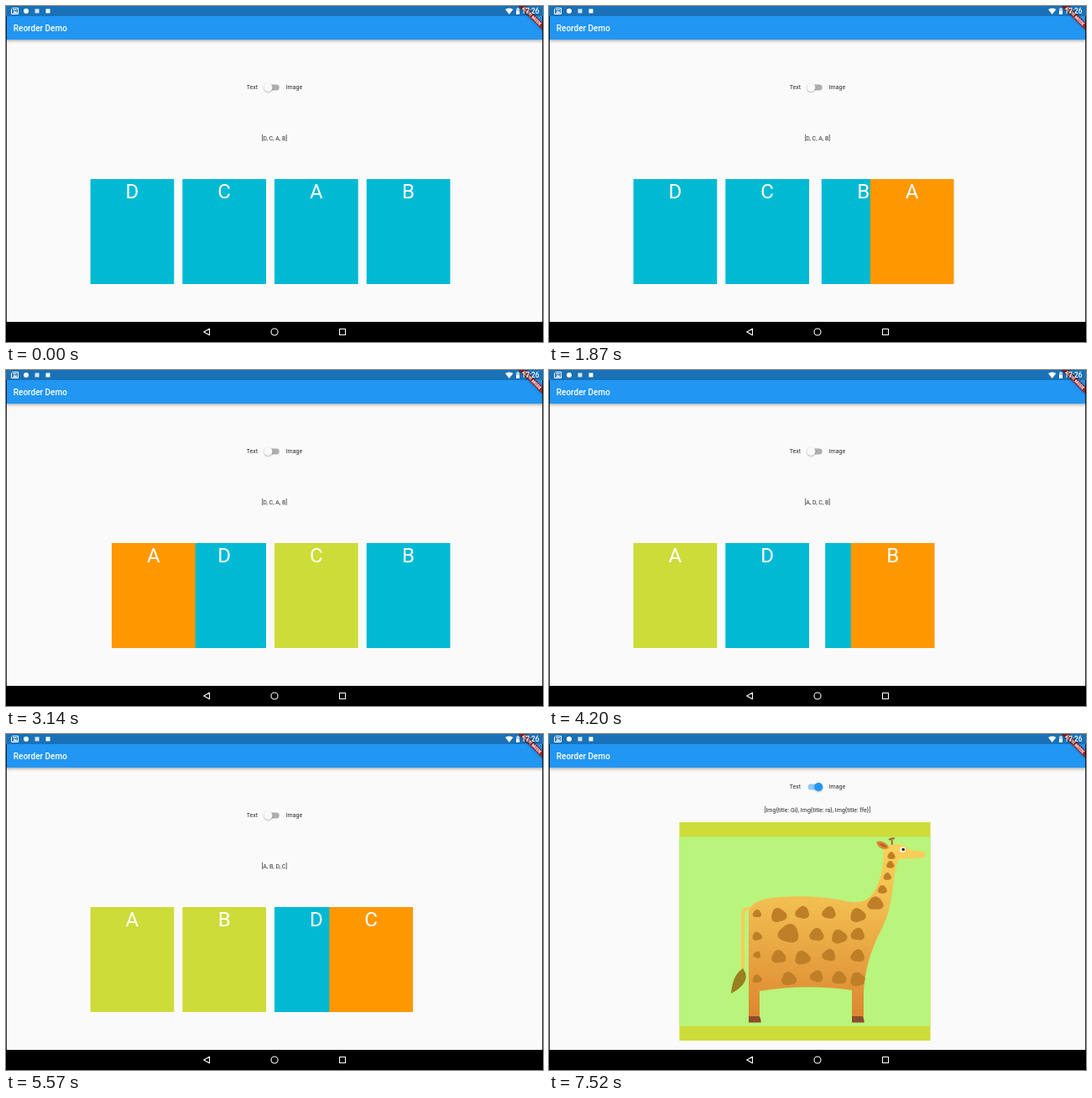
Recreate the animation shown at these times as an HTML page with a canvas. Size 640 by 400 pixels, loop 8000 ms.

```html
<!DOCTYPE html>
<html lang="en">
<head>
<meta charset="utf-8">
<title>Reorder Demo</title>
<style>
html, body { margin: 0; width: 100%; height: 100%; overflow: hidden; background: #fafafa; }
canvas { display: block; width: 640px; height: 400px; }
</style>
</head>
<body>
<canvas id="stage" width="640" height="400"></canvas>
<script>
const ctx = document.getElementById('stage').getContext('2d');
const LOOP = 8000, SLIDE = 250, SNAP = 50, TOGGLE = 7210;
const CYAN = '#00bad4', LIME = '#cddc39', ORANGE = '#ff9800', BLUE = '#2196f3';
const INK = '#2b2b2b';
const LEFT = 100.6, PITCH = 109.7, WIDTH = 99.7;

// grab: where the finger holds the tile; path: [time, x] key points.
const DRAGS = [
  { id: 'A', from: 500, to: 3350, grab: 34, path: [[1195, 320], [1640, 412], [1740, 412],
    [2350, 276], [2780, 160], [3140, 126], [3350, 114]] },
  { id: 'B', from: 3770, to: 5110, grab: 56, path: [[3820, 429.7], [4940, 224.3], [5110, 210]] },
  { id: 'C', from: 5250, to: 6100, grab: 50, path: [[5400, 429.7], [5950, 287]] }
];

const clamp = v => Math.max(0, Math.min(1, v));
const lerp = (a, b, p) => a + (b - a) * p;
const ease = p => p * p * (3 - 2 * p);
const slotX = i => LEFT + PITCH * i;

function along(path, t) {
  if (t <= path[0][0]) return path[0][1];
  for (let i = 1; i < path.length; i++) {
    const [t0, x0] = path[i - 1], [t1, x1] = path[i];
    if (t < t1) return lerp(x0, x1, (t - t0) / (t1 - t0));
  }
  return path[path.length - 1][1];
}

// The held tile takes a slot as soon as the finger enters it.
function planOrders(first) {
  const plan = [{ at: 0, order: first }];
  for (const { id, from, to, grab, path } of DRAGS) {
    for (let t = from; t < to; t += 10) {
      const { order } = plan[plan.length - 1];
      const offset = along(path, t) + grab - LEFT;
      const i = Math.floor(offset / PITCH);
      if (offset - i * PITCH > WIDTH || order[i] === id) continue;
      const rest = order.replace(id, '');
      plan.push({ at: t, order: rest.slice(0, i) + id + rest.slice(i) });
    }
  }
  return plan;
}

const PLAN = planOrders('DCAB');
const stepAt = t => PLAN.filter(s => s.at <= t).length - 1;

function box(x, y, w, h, color) {
  ctx.fillStyle = color;
  ctx.fillRect(x, y, w, h);
}

function disc(x, y, r, color) {
  ctx.fillStyle = color;
  ctx.beginPath();
  ctx.arc(x, y, r, 0, 2 * Math.PI);
  ctx.fill();
}

function shape(d, color) {
  ctx.fillStyle = color;
  ctx.fill(new Path2D(d));
}

function stroke(d, color, width) {
  ctx.strokeStyle = color;
  ctx.lineWidth = width;
  ctx.stroke(new Path2D(d));
}

function label(str, x, y, size, color, align = 'left', weight = 400) {
  ctx.font = `${weight} ${size}px Roboto, "Open Sans", sans-serif`;
  ctx.textAlign = align;
  ctx.fillStyle = color;
  ctx.fillText(str, x, y);
}

function withShadow(blur, dy, alpha, draw) {
  ctx.save();
  ctx.shadowColor = `rgba(0,0,0,${alpha})`;
  ctx.shadowBlur = blur;
  ctx.shadowOffsetY = dy;
  draw();
  ctx.restore();
}

function banner() {
  ctx.save();
  ctx.translate(639, 0);
  ctx.rotate(Math.PI / 4);
  withShadow(3, 0, 0.5, () => box(-20, 14, 40, 6, 'rgba(183,28,28,.85)'));
  label('SLOW MODE', 0, 18.8, 5.1, '#fff', 'center', 900);
  ctx.restore();
}

function statusBar() {
  box(0, 0, 640, 12, 'rgba(0,0,0,.25)');
  stroke('M7.5 2.5H14.5V9.5H6.5V3.5', '#fff', 1);
  shape('M8 8.5L10 5.5L11.3 7L12.3 6L13.8 8.5Z', '#fff');
  box(8, 4, 5, 1, '#fff');
  disc(24, 6, 3, '#fff');
  box(34.5, 3.5, 5, 5, '#d5e5f3');
  box(47.5, 3.5, 5, 5, '#fff');
  shape('M595 4Q599.7 .8 604.4 4L599.7 10Z', '#fff');
  box(608, 3, 4, 7, '#b7d0e6');
  box(609, 2, 2, 1, '#b7d0e6');
  box(608, 6, 4, 4, '#fff');
  label('17:26', 635.5, 9.3, 8.3, '#fff', 'right', 500);
}

function navBar() {
  box(0, 376, 640, 24, '#000');
  ctx.lineJoin = 'round';
  stroke('M242.5 384.2V391.8L235.7 388Z', '#fff', 1.1);
  stroke('M324 388A4 4 0 1 1 316 388A4 4 0 1 1 324 388Z', '#fff', 1.1);
  stroke('M397.5 384.5H404.5V391.5H397.5Z', '#fff', 1.1);
}

function frame() {
  box(0, 0, 640, 400, '#fafafa');
  withShadow(4, 1, 0.4, () => box(0, 0, 640, 40, BLUE));
  label('Reorder Demo', 8.8, 29.7, 10, '#fff', 'left', 500);
  banner();
  statusBar();
  for (const x of [0, 639]) box(x, 12, 1, 364, 'rgba(0,0,0,.8)');
  navBar();
}

function toggle(y, p) {
  label('Text', 286.7, y + 2.4, 7, INK);
  label('Image', 333.7, y + 2.4, 7, INK);
  ctx.fillStyle = p > 0 ? `rgba(33,150,243,${lerp(0.3, 0.5, p)})` : 'rgba(0,0,0,.3)';
  ctx.beginPath();
  ctx.roundRect(308.7, y - 3.5, 17, 7, 3.5);
  ctx.fill();
  const mix = [33, 150, 243].map(c => Math.round(lerp(250, c, p)));
  withShadow(2, 0.7, 0.35, () => disc(lerp(312.5, 321.3, p), y, 5, `rgb(${mix})`));
}

function tile(id, x, color) {
  box(x, 206, WIDTH, 125, color);
  label(id, x + WIDTH / 2, 229, 24, '#fff', 'center');
}

function tiles(t) {
  const i = stepAt(t), { at, order } = PLAN[i];
  const before = PLAN[Math.max(0, i - 1)].order;
  const held = DRAGS.find(d => t >= d.from && t < d.to + SNAP);
  const p = clamp((t - at) / SLIDE);
  [...order].forEach((id, n) => {
    if (held && held.id === id) return;
    tile(id, slotX(lerp(before.indexOf(id), n, p)), 'ABCD'[n] === id ? LIME : CYAN);
  });
  if (held) tile(held.id, along(held.path, t), t < held.to ? ORANGE : LIME);

  const lastDrop = Math.max(0, ...DRAGS.map(d => d.to).filter(to => to <= t));
  const saved = PLAN[stepAt(lastDrop)].order;
  label(`[${[...saved].join(', ')}]`, 319.8, 160, 7, INK, 'center');
}

// A rounded, slightly three-cornered coat patch.
function patch(x, y, w, h, turn) {
  ctx.beginPath();
  for (let a = 0; a < 6.28; a += 0.15) {
    const r = 0.97 + 0.1 * Math.sin(3 * a + turn);
    ctx.lineTo(x + w * r * Math.cos(a), y + h * r * Math.sin(a));
  }
  ctx.closePath();
  ctx.fill();
}

function coatPatches() {
  ctx.fillStyle = '#bf7f27';
  // Down the neck, growing towards the shoulder.
  for (let p = 0; p <= 1; p += 0.25) {
    const grow = 5 * p ** 6;
    patch(408 - 19 * p * p, 145 + 57 * p ** 1.2, 4.6 + grow, 4.4 + grow * 0.7, 0);
  }
  // Staggered rows over the body, largest on the flank, small along the rump.
  for (let row = 0; row < 4; row++) {
    for (let col = 0; col < 5; col++) {
      const wave = Math.sin(row * 2.3 + col * 1.9);
      const bend = Math.sin(Math.PI * col / 4) * (row % 2 ? 11 : -6);
      const x = 248 + 30 * col + bend, y = 214 + 25.5 * row + 2 * wave;
      const flank = Math.exp(-((x - 292) ** 2 + (y - 236) ** 2) / 200);
      const size = (col ? 8.6 : 5.2) + 5.5 * flank + 0.7 * wave;
      patch(x, y, size, size * 0.9, wave);
    }
  }
}

function giraffe() {
  box(155.4, 105, 299.2, 260, LIME);
  box(155.4, 122.4, 299.2, 225.4, '#b9f47c');
  const coat = ctx.createLinearGradient(0, 130, 0, 335);
  coat.addColorStop(0, '#fbd25a');
  coat.addColorStop(0.35, '#f1bd50');
  coat.addColorStop(1, '#dd8730');

  stroke('M244 208H237Q231 208 231 215V282', '#f6cc5c', 4);
  shape('M231 279C238 288 236 299 217 309C218 295 222 285 231 279Z', '#9a801f');
  stroke('M409 134L408.5 125M405 126Q408 123.5 412 124.5', '#a56a2b', 2);

  const body = new Path2D(`M399 137Q406 130 416 131Q424 131 430 138L448 140V147Q431 149 419 148
    C413 151 412 167 409 188C406 212 400 226 391 243C381 265 376 286 375 308V337H361V305
    Q305 297 251 306V337H238V212Q241 199 260 196C290 191 329 193 354 199
    Q376 204 386 190C398 172 398 153 399 137Z`);
  ctx.fillStyle = coat;
  ctx.fill(body);
  ctx.save();
  ctx.clip(body);
  coatPatches();
  ctx.restore();

  shape('M405 136C398 139 392 136 390 128C397 126 404 130 405 136Z', '#dc8a37');
  shape('M403 135Q396 135 393 130Q400 130 403 135Z', '#b95f2c');
  for (const x of [238, 361])
    shape(`M${x} 336H${x + 12.5}Q${x + 15} 339 ${x + 14.5} 343.5H${x}Z`, '#8b4c2b');
  disc(421.5, 137.5, 3.3, '#fff');
  disc(422.2, 137.5, 1.8, '#222');
}

function draw(now) {
  const t = now % LOOP;
  frame();
  if (t < TOGGLE) {
    toggle(97, 0);
    tiles(t);
  } else {
    toggle(63, ease(clamp((t - TOGGLE) / 200)));
    label('[Img{title: Gi}, Img{title: ra}, Img{title: ffe}]', 319.8, 92.7, 7, INK, 'center');
    giraffe();
  }
}

const start = performance.now();
(function tick() {
  draw(performance.now() - start);
  requestAnimationFrame(tick);
})();
</script>
</body>
</html>
```
